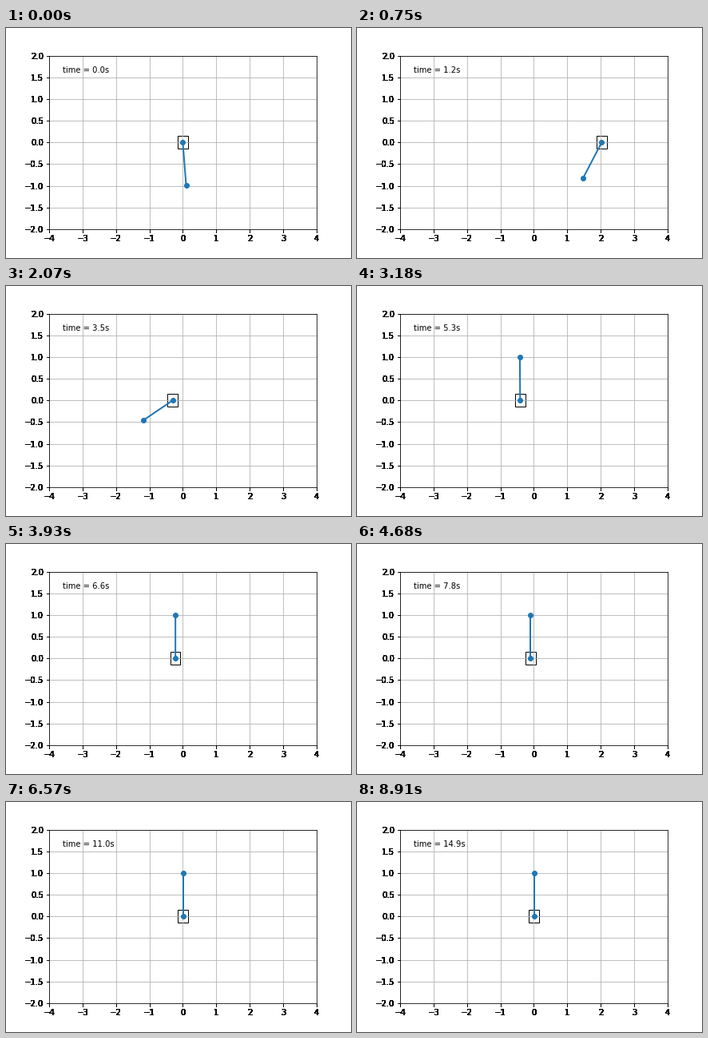
A matplotlib script that plays this animation: 432x288 px, repeating every 8970 ms.

```python
import numpy as np
import matplotlib.pyplot as plt
from matplotlib.animation import FuncAnimation
from matplotlib.patches import Rectangle

FRAMES, INTERVAL, DT = 299, 30, 0.05
CART = 0.3

# (time, value) turning points of the swing-up
CART_KEYS = [(0, 0), (0.5, 0.2), (0.9, 1.2), (1.25, 2.03), (1.65, 1.65),
             (2.1, 0.95), (2.7, 0.7), (3.45, -0.305), (4.2, -0.7), (5.3, -0.41)]
POLE_KEYS = [(0, 0.1), (0.5, -0.1), (1.0, -1.1), (1.25, -0.595), (1.5, 0.57),
             (2.3, 2.2), (3.0, 0.6), (3.45, -1.09), (4.0, -2.5)]


def motion(keys, t, rest, rate, freq=0):
    """Cubic curve through the keys, then a damped return to rest."""
    kt, kv = np.array(keys, float).T
    gap = kv[-1] - rest
    slope = np.gradient(kv, kt)
    slope[0], slope[-1] = 0, -rate * gap
    i = np.clip(np.searchsorted(kt, t, side="right") - 1, 0, len(kt) - 2)
    h = kt[i + 1] - kt[i]
    s = (t - kt[i]) / h
    curve = ((1 + 2 * s) * (1 - s) ** 2 * kv[i] + s * (1 - s) ** 2 * h * slope[i]
             + s * s * (3 - 2 * s) * kv[i + 1] + s * s * (s - 1) * h * slope[i + 1])
    late = np.maximum(t - kt[-1], 0)
    settle = rest + gap * np.exp(-rate * late) * np.cos(freq * late)
    return np.where(t < kt[-1], curve, settle)


def heavy_labels(fig, ax, passes=20):
    """Darken the tick labels as if they were drawn over themselves."""
    ax.spines[:].set_visible(False)
    fig.canvas.draw()
    shot = np.asarray(fig.canvas.buffer_rgba())[..., :3] / 255
    fig.figimage(shot ** passes, origin="upper", zorder=-1)
    ax.spines[:].set_visible(True)
    ax.tick_params(labelleft=False, labelbottom=False)


times = np.arange(FRAMES) * DT
cart_x = motion(CART_KEYS, times, rest=0, rate=0.43, freq=0.32)
theta = motion(POLE_KEYS, times, rest=-np.pi, rate=3.4)
tip_x, tip_y = cart_x + np.sin(theta), -np.cos(theta)

fig = plt.figure(figsize=(6, 4), dpi=72, facecolor="white")
fig.subplots_adjust(left=0.125, right=0.9, bottom=0.125, top=0.88)
ax = fig.add_subplot(xlim=(-4, 4), ylim=(-2, 2),
                     xticks=np.arange(-4, 5), yticks=np.arange(-2, 2.1, 0.5))
ax.grid()
heavy_labels(fig, ax)

cart = ax.add_patch(Rectangle((0, 0), CART, CART, lw=1, ec="k", fc="none"))
pole, = ax.plot([], [], "o-", lw=2, ms=6, color="tab:blue")
clock = ax.text(0.05, 0.9, "", transform=ax.transAxes)


def animate(i):
    pole.set_data([cart_x[i], tip_x[i]], [0, tip_y[i]])
    cart.set_xy((cart_x[i] - CART / 2, -CART / 2))
    clock.set_text(f"time = {i * DT:.1f}s")
    return pole, cart, clock


anim = FuncAnimation(fig, animate, frames=FRAMES, interval=INTERVAL,
                     repeat=True, repeat_delay=0)
plt.show()
```
